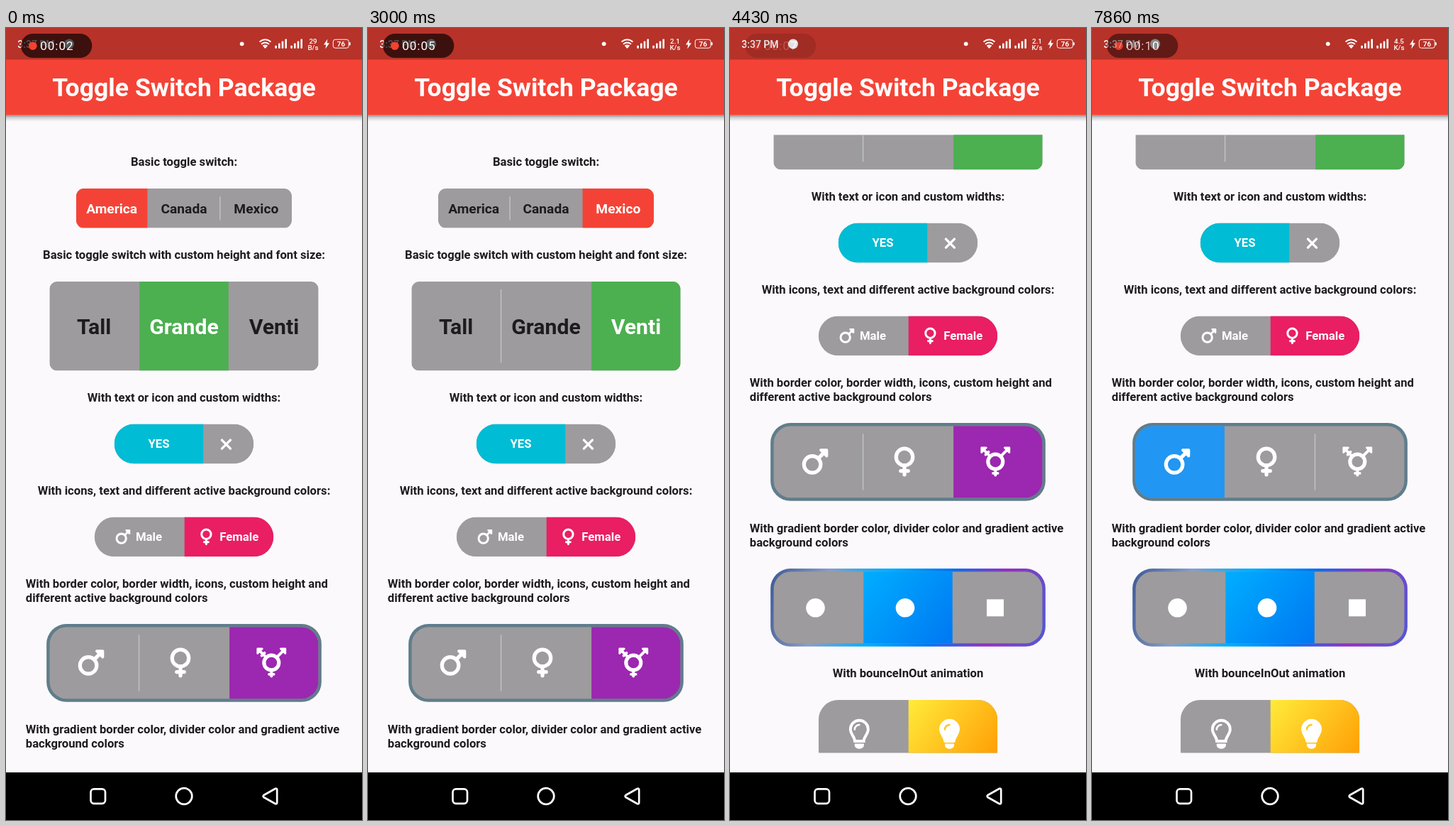
Animation of 502x1115 px, one loop 8 s. Source, as an HTML page:

```html
<!DOCTYPE html>
<html lang="en">
<head>
<meta charset="utf-8">
<title>Toggle switches</title>
<style>
  html, body { margin: 0; width: 100%; height: 100%; overflow: hidden; background: #fbf9fc; }
  svg { display: block; width: 100%; height: 100%; font-family: Roboto, sans-serif; }
  .bold { font-weight: 700; }
</style>
</head>
<body>
<svg id="stage" viewBox="0 0 502 1115"></svg>
<script>
const LOOP = 8000, FPS = 7;
const GREY = '#9d9b9e', DARK = '#1d1b1e', GAP = 1.4;
const stage = document.getElementById('stage');

function add(parent, tag, attrs = {}, text) {
  const node = document.createElementNS('http://www.w3.org/2000/svg', tag);
  for (const key in attrs) node.setAttribute(key, attrs[key]);
  if (text !== undefined) node.textContent = text;
  parent.appendChild(node);
  return node;
}
const rect = (parent, x, y, width, height, fill, rx = 0) =>
  add(parent, 'rect', { x, y, width, height, fill, rx });
const label = (parent, x, y, size, text, attrs = {}) =>
  add(parent, 'text', { x, y, 'font-size': size, class: 'bold', fill: DARK, ...attrs }, text);
const MIDDLE = { 'text-anchor': 'middle' };
const WHITE = { fill: '#fff' };
const show = (node, on) => node.setAttribute('visibility', on ? 'visible' : 'hidden');

const defs = add(stage, 'defs');
let ids = 0;

// Diagonal gradient across a box, from top left to bottom right
function gradient(x, y, w, h, colors) {
  const id = 'g' + ids++;
  const node = add(defs, 'linearGradient',
    { id, gradientUnits: 'userSpaceOnUse', x1: x, y1: y, x2: x + w, y2: y + h });
  colors.forEach((c, i) => add(node, 'stop', { offset: i / (colors.length - 1), 'stop-color': c }));
  return `url(#${id})`;
}
function clip(x, y, w, h, r) {
  const id = 'c' + ids++;
  rect(add(defs, 'clipPath', { id }), x, y, w, h, '#000', r);
  return `url(#${id})`;
}

// Icons are drawn around their own centre; the gender signs on a 512 unit grid
const line = (d, w) => `<path d="${d}" fill="none" stroke="currentColor" stroke-width="${w}" stroke-linecap="round"/>`;
const solid = (d, w) => `<path d="${d}" fill="currentColor" stroke="currentColor" stroke-width="${w}" stroke-linejoin="round"/>`;
const ring = (x, y, r, w) => `<circle cx="${x}" cy="${y}" r="${r}" fill="none" stroke="currentColor" stroke-width="${w}"/>`;
const BULB = 'M-6.3 10C-6.3 4-12.5 0-12.5-6.7A12.5 12.5 0 0 1 12.5-6.7C12.5 0 6.3 4 6.3 10Z';
const BULB_BASE = solid('M-6 14.2H6V15.5A6 4.7 0 0 1-6 15.5Z', 1.2);
const SHINE = 'M-6.5-6.5A6.5 6.5 0 0 1 0-13';
const ICONS = {
  male: ring(-48, 48, 144, 64) + line('M74-74L170-170', 64) + solid('M98-200H200V-98Z', 48),
  female: ring(0, -80, 144, 64) + line('M0 90V224M-64 160H64', 64),
  trans: ring(0, 0, 128, 64) + line('M0 158V232M-40 200H40M102-102L200-200M-102-102L-200-200M-168-120L-120-168', 48)
    + solid('M158-240H240V-158Z', 32) + solid('M-158-240H-240V-158Z', 32),
  cross: line('M-6-6L6 6M6-6L-6 6', 3.4),
  bulb: `<path d="${BULB}" fill="none" stroke="currentColor" stroke-width="3.9"/>` + BULB_BASE + line(SHINE, 2.6),
  bulbOn: solid(BULB, 3.9) + BULB_BASE + `<path d="${SHINE}" fill="none" stroke="#ffc81e" stroke-width="2.6" stroke-linecap="round"/>`,
  disc: '<circle r="13.3" fill="currentColor"/>',
  square: '<rect x="-12" y="-12" width="24" height="24" fill="currentColor"/>'
};
function icon(parent, name, x, y, scale = 1) {
  const node = add(parent, 'g', { transform: `translate(${x} ${y}) scale(${scale})`, color: '#fff' });
  node.innerHTML = ICONS[name];
}

// App page
rect(stage, 0, 0, 502, 1115, '#fbf9fc');
const viewport = add(stage, 'g', { 'clip-path': clip(0, 150.5, 502, 870, 0) });
const page = add(viewport, 'g');

const LABEL_SIZE = 16.65;
[[194, 'Basic toggle switch:'],
 [325, 'Basic toggle switch with custom height and font size:'],
 [526, 'With text or icon and custom widths:'],
 [657, 'With icons, text and different active background colors:'],
 [1197, 'With bounceInOut animation']
].forEach(([y, text]) => label(page, 251, y, LABEL_SIZE, text, MIDDLE));
[[788, 'With border color, border width, icons, custom height and'],
 [807.5, 'different active background colors'],
 [993, 'With gradient border color, divider color and gradient active'],
 [1012.5, 'background colors']
].forEach(([y, text]) => label(page, 27.8, y, LABEL_SIZE, text));

// taps: [time, selected cell] in order
function toggle({ y, h, r, widths, colors, border, taps, draw, textColor }) {
  const total = widths.reduce((a, b) => a + b) + GAP * (widths.length - 1);
  const left = 251 - total / 2;
  if (border) rect(page, left - 4.2, y - 4.2, total + 8.4, h + 8.4, border, r + 3);
  const body = add(page, 'g', { 'clip-path': clip(left, y, total, h, r) });
  rect(body, left, y, total, h, GREY);
  let x = left;
  const cells = widths.map((w, i) => {
    const fill = Array.isArray(colors[i]) ? gradient(x, y, w, h, colors[i]) : colors[i];
    const back = rect(body, x, y, w, h, fill);
    const divider = i ? rect(body, x - GAP, y + 11, GAP, h - 22, '#c4c3c5') : null;
    const front = add(body, 'g');
    draw(front, i, x + w / 2, y + h / 2);
    x += w + GAP;
    return { back, divider, front };
  });
  return time => {
    const active = taps.filter(tap => tap[0] <= time).pop()[1];
    cells.forEach(({ back, divider, front }, i) => {
      show(back, i === active);
      if (divider) show(divider, i !== active && i - 1 !== active);
      if (textColor) front.firstChild.setAttribute('fill', i === active ? '#fff' : textColor);
    });
  };
}
const words = (list, size) => (g, i, x, y) => label(g, x, y + size * 0.36, size, list[i], MIDDLE);

const toggles = [
  toggle({
    y: 226, h: 55.6, r: 11, widths: [100.4, 100.4, 100.4], colors: ['#f44336', '#f44336', '#f44336'],
    taps: [[0, 0], [850, 1], [1570, 2]], draw: words(['America', 'Canada', 'Mexico'], 19.2), textColor: DARK
  }),
  toggle({
    y: 357, h: 125.4, r: 11, widths: [125.5, 125.5, 125.5], colors: ['#4caf50', '#4caf50', '#4caf50'],
    taps: [[0, 1], [2280, 0], [2850, 2]], draw: words(['Tall', 'Grande', 'Venti'], 30.2), textColor: DARK
  }),
  toggle({
    y: 557.6, h: 55.8, r: 27.9, widths: [125.5, 69.7], colors: ['#00bcd4', '#ff5252'],
    taps: [[0, 0], [5560, 1], [5990, 0]],
    draw: (g, i, x, y) => i ? icon(g, 'cross', x - 4, y + 0.6) : label(g, x, y + 5.8, 16.7, 'YES', { ...MIDDLE, ...WHITE })
  }),
  toggle({
    y: 688.5, h: 55.8, r: 27.9, widths: [125.5, 125.5], colors: ['#2196f3', '#e91e63'],
    taps: [[0, 1], [6280, 0], [6710, 1]],
    draw: (g, i, x, y) => {
      icon(g, i ? 'female' : 'male', i ? 282.4 : 164.9, y, 0.0463);
      label(g, i ? 301.2 : 182.9, y + 6, 16.75, i ? 'Female' : 'Male', WHITE);
    }
  }),
  toggle({
    y: 843.2, h: 101.4, r: 25, widths: [125.5, 125.5, 125.5], colors: ['#2196f3', '#e91e63', '#9c27b0'],
    border: '#607d8b', taps: [[0, 2], [7280, 1], [7710, 0]],
    draw: (g, i, x, y) => icon(g, ['male', 'female', 'trans'][i], [120, 246, 374.3][i], y - 0.4, 0.0817)
  }),
  toggle({
    y: 1048.2, h: 101.4, r: 25, widths: [125.5, 125.5, 125.5],
    colors: [['#3b5998', '#8b9dc3'], ['#00aeff', '#0077f2'], ['#feda75', '#d62976', '#4f5bd5']],
    border: gradient(57, 1044, 388, 110, ['#3b5998', '#8b9dc3', '#00aeff', '#0077f2', '#962fbf', '#4f5bd5']),
    taps: [[0, 1]],
    draw: (g, i) => icon(g, i < 2 ? 'disc' : 'square', [120.5, 247, 374][i], 1099.3)
  }),
  toggle({
    y: 1229, h: 98, r: 27.9, widths: [125.5, 125.5], colors: [GREY, ['#ffeb3b', '#ff9800']],
    taps: [[0, 1]],
    draw: (g, i) => icon(g, i ? 'bulbOn' : 'bulb', i ? 309.5 : 182.3, 1277)
  })
];

// App bar and its shadow
const shade = add(defs, 'linearGradient', { id: 'shade', x2: 0, y2: 1 });
[[0, 0.4], [0.4, 0.16], [1, 0]].forEach(([offset, alpha]) =>
  add(shade, 'stop', { offset, 'stop-color': '#000', 'stop-opacity': alpha }));
rect(stage, 0, 122.7, 502, 9, 'url(#shade)');
rect(stage, 0, 44, 502, 78.7, '#f44336');
label(stage, 251, 96.3, 35.6, 'Toggle Switch Package', { ...MIDDLE, ...WHITE });

// Status bar
rect(stage, 0, 0, 502, 44.5, '#b73229');
const status = add(stage, 'g', { fill: '#fff' });
add(status, 'text', { x: 16.3, y: 27.5, 'font-size': 14, 'font-weight': 500 }, '3:37 PM');
add(status, 'circle', { cx: 89, cy: 22.5, r: 7 });
add(status, 'circle', { cx: 332.7, cy: 22.3, r: 2.9 });
add(status, 'path', {
  d: 'M357.5 19.5Q365.5 13 373.5 19.5M360 22.7Q365.5 18.3 371 22.7M362.4 25.6Q365.5 23.2 368.6 25.6',
  fill: 'none', stroke: '#fff', 'stroke-width': 1.9
});
add(status, 'path', { d: 'M363 26.3Q365.5 24.8 368 26.3L365.5 29Z' });
for (const x of [379.3, 401.3])
  for (let i = 0; i < 4; i++) {
    const h = 4 + i * 3.1;
    rect(status, x + i * 4.7, 28.7 - h, 2.6, h, '#fff', 0.6);
  }
const netText = { 'text-anchor': 'middle', 'font-size': 9.8, 'font-weight': 500 };
const rate = add(status, 'text', { x: 433, y: 21.8, ...netText });
const unit = add(status, 'text', { x: 433, y: 31, ...netText });
add(status, 'path', { d: 'M453.5 15.5L448 23.5H451.3L450.3 29.5L456 21.2H452.6Z' });
rect(status, 461.3, 16.2, 22, 12, 'none', 3).setAttribute('stroke', '#fff');
rect(status, 484, 20, 1.8, 4.5, '#fff', 0.8);
add(status, 'text', { x: 472.4, y: 26, ...netText, 'font-weight': 700 }, '76');

// Recorder pill
const pill = add(stage, 'g');
rect(pill, 21, 8, 100.3, 34, 'rgba(0,0,0,.67)', 17);
add(pill, 'circle', { cx: 37.8, cy: 25.2, r: 5.8, fill: '#f6412f' });
const timer = add(pill, 'text', { x: 48.2, y: 31.3, 'font-size': 17, 'letter-spacing': 1, fill: '#fff' });

// Navigation bar
rect(stage, 0, 1048, 502, 67, '#000');
const nav = add(stage, 'g', { fill: 'none', stroke: '#fff', 'stroke-width': 2.7, 'stroke-linejoin': 'round' });
rect(nav, 119.5, 1071.3, 20.5, 20.5, 'none', 4.5);
add(nav, 'circle', { cx: 251, cy: 1081.5, r: 11.3 });
add(nav, 'path', { d: 'M363.5 1080Q361.8 1081.5 363.5 1083L379.5 1092Q382.2 1093 382.2 1090.5V1072.5Q382.2 1070 379.5 1071Z' });

const SCROLL = [[3290, 0], [3430, 20], [3570, 119], [3715, 203], [3860, 261], [4000, 277], [4140, 283]];
// Alternating bright and faint moments of the recorder pill
const BLINK = [0, 480, 1000, 1480, 2100, 2600, 3000, 3490, 4080, 4480, 5000, 5430, 6050, 6600, 7120, 7480, 8050];

function scrollAt(time) {
  const i = SCROLL.findIndex(key => key[0] > time);
  if (i < 0) return 283;
  if (i === 0) return 0;
  const [t0, a] = SCROLL[i - 1], [t1, b] = SCROLL[i];
  return a + (b - a) * (time - t0) / (t1 - t0);
}
function pillAlpha(time) {
  const i = BLINK.findIndex(turn => turn > time);
  const p = (time - BLINK[i - 1]) / (BLINK[i] - BLINK[i - 1]);
  return 0.06 + 0.94 * (i % 2 ? 1 - p : p);
}

function render(ms) {
  const step = Math.floor((ms % LOOP + 5) * FPS / 1000) % (LOOP * FPS / 1000);
  const time = Math.round(step * 100 / FPS) * 10;
  toggles.forEach(update => update(time));
  page.setAttribute('transform', `translate(0 ${-scrollAt(time)})`);
  pill.setAttribute('opacity', pillAlpha(time));
  timer.textContent = '00:' + String(Math.floor(time / 1000 + 2.6)).padStart(2, '0');
  rate.textContent = time < 2570 ? '29' : time < 5560 ? '2.1' : '4.5';
  unit.textContent = time < 2570 ? 'B/s' : 'K/s';
}

let start;
function tick(now) {
  start ??= now;
  render(now - start);
  requestAnimationFrame(tick);
}
render(0);
requestAnimationFrame(tick);
</script>
</body>
</html>
```
